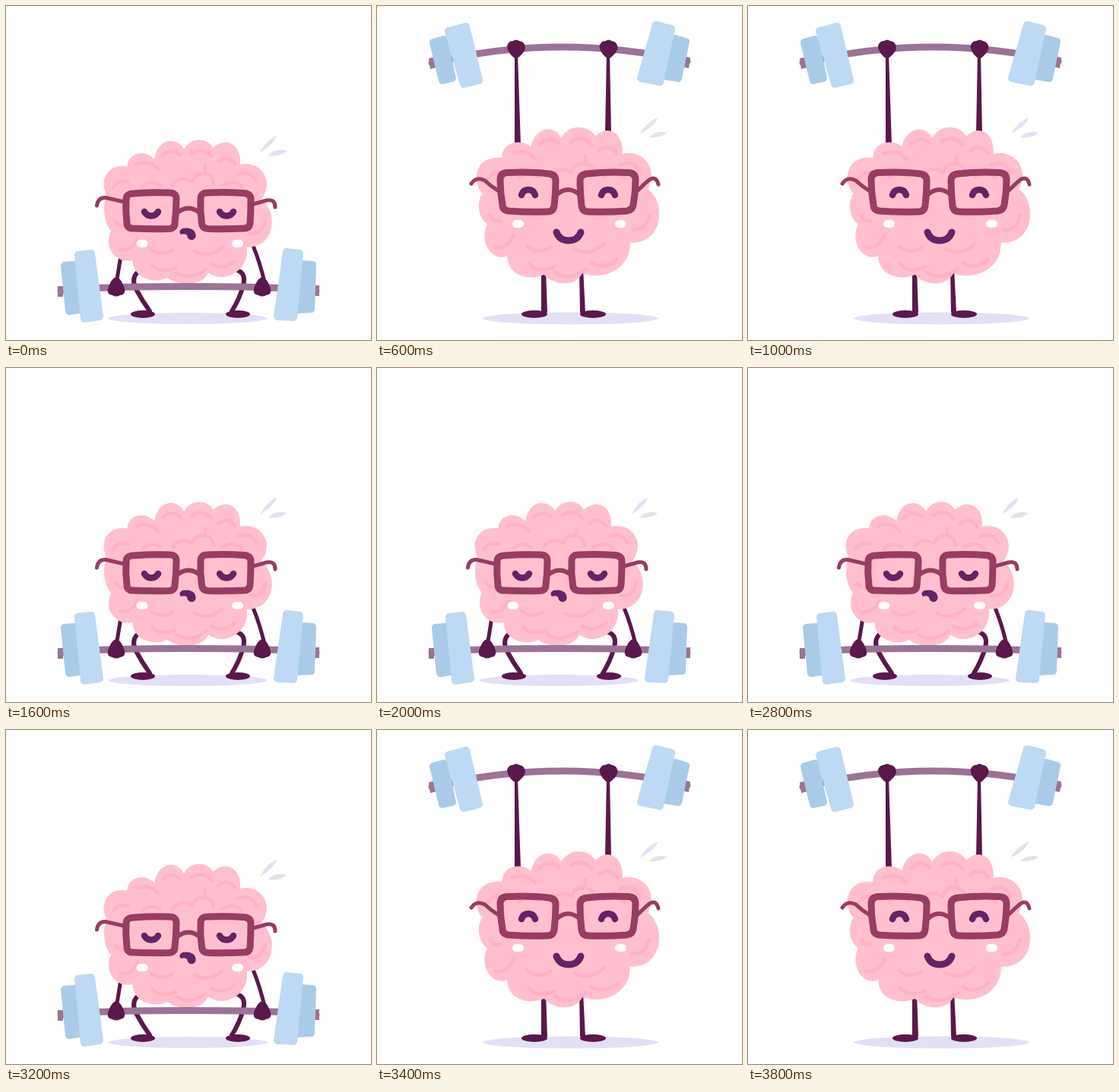
Write an HTML page that moves like this. It is 480x440 px and loops after 4 s.

```html
<!DOCTYPE html>
<html lang="en">
<head>
<meta charset="utf-8">
<title>Brain lifting a barbell</title>
<style>
  html, body { margin: 0; width: 100%; height: 100%; overflow: hidden; background: #fff; }
  svg { display: block; width: 100vw; height: 100vh; }
</style>
</head>
<body>
<svg id="stage" viewBox="0 0 480 440"></svg>
<script>
const STEP = 200;
const color = {
  shadow: '#e3e0f5', brain: '#ffbfce', fold: '#ffb1c5', limb: '#5a184b',
  frame: '#983c62', face: '#622465', bar: '#9b7395', plate: '#bdd9f4', backPlate: '#aacbe7'
};

const fill = (d, c) => `<path d="${d}" fill="${c}"/>`;
const line = (d, c, width) =>
  `<path d="${d}" fill="none" stroke="${c}" stroke-width="${width}" stroke-linecap="round" stroke-linejoin="round"/>`;
const oval = (cx, cy, rx, ry, c) => `<ellipse cx="${cx}" cy="${cy}" rx="${rx}" ry="${ry}" fill="${c}"/>`;
const shift = (dx, dy, content) => `<g transform="translate(${dx} ${dy})">${content}</g>`;
// Polygon whose corners are rounded by its own stroke.
const slab = (points, c) =>
  `<polygon points="${points}" fill="${c}" stroke="${c}" stroke-width="10" stroke-linejoin="round"/>`;
const body = d =>
  `<path d="${d}" fill="${color.brain}" stroke="${color.brain}" stroke-width="1.5" stroke-linejoin="round"/>`;
const lens = d => line(d + 'Z', color.frame, 9);
const cheek = (x, y) => `<rect x="${x}" y="${y}" width="15" height="10" rx="5" fill="#fff"/>`;

const folds = line(`
  M172 208Q190 203 200 215 M206 197Q216 186 229 196 M244 194Q258 185 270 198
  M279 205Q292 195 301 208 M305 222Q322 215 329 231 M141 239Q147 228 160 232
  M219 236Q228 222 245 231Q249 218 263 221Q272 223 273 234 M262 211V221
  M179 238Q190 228 203 236 M284 236Q300 227 310 238
  M150 321Q166 323 173 306 M190 320Q204 331 219 321
  M192 341Q202 353 223 345 M224 351Q241 363 263 347
  M248 323Q268 333 285 317 M270 340Q285 349 301 336
  M320 300Q337 301 341 283 M144 283Q149 291 156 289`, color.fold, 4.5);

function restPose() {
  const hand = fill('M145 357Q150 358 154 367Q160 380 150 381Q145 384 140 381Q130 380 136 367Q140 358 145 357Z', color.limb);
  const eye = line('M182 271Q185 276.5 191 276.5Q197 276.5 200 271', color.face, 8.5);
  return [
    oval(239, 411.5, 104.5, 7.5, color.shadow),
    fill('M334 193Q340 179 356 170Q354 181 334 193Z M345 197Q354 187 369 191Q361 199 345 197Z', color.shadow),
    line('M174 350Q164 358 171 373Q179 388 189 402', color.limb, 6),
    line('M304 348Q316 352 312 368Q307 386 297 402', color.limb, 6),
    oval(180, 406, 16, 5, color.limb),
    oval(305, 406, 16, 5, color.limb),
    line('M151 329L145 366', color.limb, 5),
    line('M325 316Q334 338 340 364', color.limb, 5),
    body(`M133 249C123 228 135 208 160 212C161 192 184 190 196 203C198 176 224 171 234 190
      C242 174 264 172 272 188C286 173 310 180 307 210C334 202 354 232 334 255
      C358 270 354 318 316 317C320 350 284 366 266 350C258 369 226 369 212 357
      C194 366 168 358 167 334C146 340 128 318 139 296C128 284 128 262 133 249Z`),
    folds,
    cheek(171.5, 308), cheek(297, 308),
    lens('M168 247Q192 245 215 246Q224 246 224 254Q224 270 222 286Q222 293 214 293.5Q190 294 167 293Q159 293 159 286Q157 270 158 255Q158 247 168 247'),
    lens('M265 246Q290 245 312 246.5Q322 247 322 255Q322 270 321 286Q320 293 313 293Q290 294 266 293.5Q258 293 257.5 286Q255 270 256 254Q256 246 265 246'),
    line('M227 271Q240 262 253 271', color.frame, 6),
    line('M155 258L131 252.5Q121 252 119.5 263', color.frame, 5),
    line('M325 261L343 256Q354 254 354 265', color.frame, 5),
    eye, shift(99, 0, eye),
    fill('M230 301Q226 296 232 293Q243 291 248 297Q252 305 246 308Q239 309 238 302Q236 299 230 301Z', color.face),
    line('M72 375C130 367.5 350 367.5 408 375', color.bar, 9),
    fill('M68 369h7v14h-7z M405 368h7v14h-7z', color.bar),
    slab('77,342 92,341 96,400 83,402', color.backPlate),
    slab('95,328 112,326 123,409 103,412', color.plate),
    slab('388,340 403,341 401,399 383,400', color.backPlate),
    slab('369,324 386,326 378,410 357,409', color.plate),
    hand, shift(192, 0, hand)
  ].join('');
}

function liftPose() {
  const hand = fill('M171 54Q172 46 179 46Q183 43 187 46Q195 47 195 56Q193 63 183 70Q173 64 171 54Z', color.limb);
  const eye = line('M190 249Q192 242 199 242Q206 242 208 249', color.face, 8.5);
  return [
    oval(254.5, 411.5, 115.5, 8, color.shadow),
    fill('M346 168Q352 155 369 147Q366 158 346 168Z M358 173Q367 163 382 167Q373 174 358 173Z', color.shadow),
    fill('M216 345H222L224 404H216Z M266 345H271L274 404H267Z', color.limb),
    oval(207, 406, 17, 5, color.limb),
    oval(284, 406, 17, 5, color.limb),
    line('M72 75Q240 34 408 73', color.bar, 9),
    fill('M68 69L76 67L78 81L70 83Z M404 66L412 68L410 82L402 80Z', color.bar),
    slab('74,48 88,44 99,95 86,98', color.backPlate),
    slab('94,33 117,27 134,98 114,103', color.plate),
    slab('392,43 406,47 396,95 378,92', color.backPlate),
    slab('367,25 387,30 372,100 347,95', color.plate),
    fill('M181 62H185L189 182H181Z M302 62H306L308 168H300Z', color.limb),
    hand, shift(121.5, 0, hand),
    body(`M140 247C126 236 126 196 165 201C164 180 190 174 203 187C207 160 234 156 242 175
      C252 156 278 156 287 173C304 155 324 168 322 196C350 188 370 216 355 241
      C380 258 376 314 332 311C334 346 296 362 270 351C260 370 232 368 220 353
      C198 362 172 354 172 328C152 338 134 310 146 287C132 278 132 256 140 247Z`),
    `<g transform="matrix(1.06 0 0 1.095 -3.6 -33.8)">${folds}</g>`,
    cheek(178, 282), cheek(313, 282),
    lens('M171 219.5Q202 218 226 221Q235 222 235 230Q235 247 233 263Q232 271 224 271Q198 272 173 270Q165 269 165 262Q162 245 162 229Q162 220 171 219.5'),
    lens('M276 221Q302 218 331 219.5Q340 220 340 229Q340 245 337 262Q336 269 328 270Q304 272 278 271Q270 271 269 263Q267 247 267 230Q267 222 276 221'),
    line('M237 248Q251 236 266 248', color.frame, 6),
    line('M159 243Q149 237 142 230Q131 224 124 234', color.frame, 5),
    line('M343 243Q352 234 358 229Q367 223 370 235', color.frame, 5),
    eye, shift(105, 0, eye),
    line('M236 298Q240 309 252 309Q264 309 268 298', color.face, 9)
  ].join('');
}

const stage = document.getElementById('stage');
stage.innerHTML = `<g>${restPose()}</g><g>${liftPose()}</g>`;
const poses = [...stage.children];

function update() {
  const active = Math.floor(performance.now() / STEP) % poses.length;
  poses.forEach((pose, i) => pose.style.display = i === active ? '' : 'none');
  requestAnimationFrame(update);
}
update();
</script>
</body>
</html>
```
